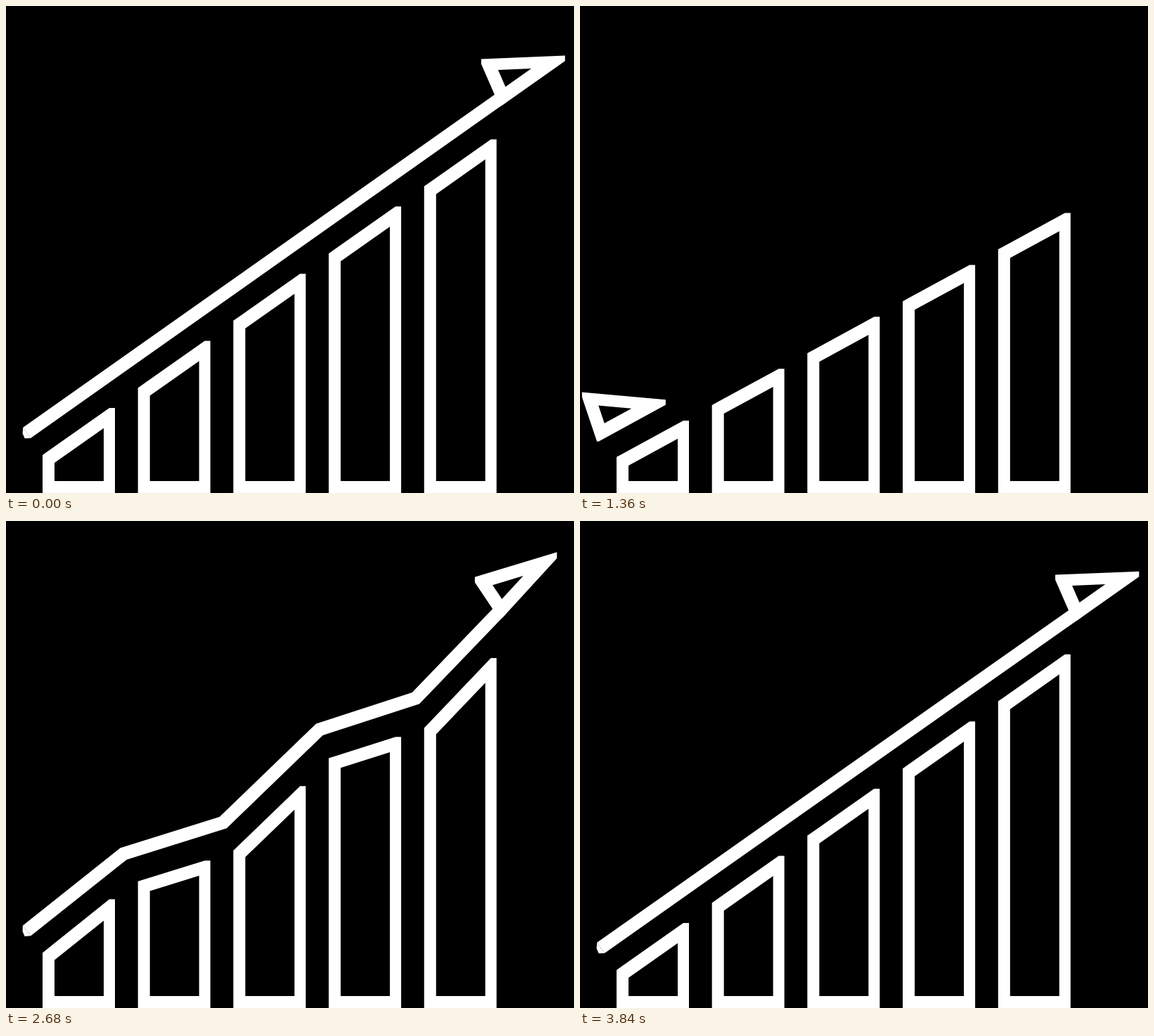
These frames come from a looping animation (808x693 px, 3880 ms). An HTML page with a canvas:

```html
<!DOCTYPE html>
<html lang="en">
<head>
<meta charset="utf-8">
<title>Growth chart</title>
<style>
  html, body { margin: 0; width: 100%; height: 100%; overflow: hidden; background: #000; }
  canvas { display: block; }
</style>
</head>
<body>
<canvas id="stage" width="808" height="693"></canvas>
<script>
const ctx = document.getElementById('stage').getContext('2d');
const LOOP = 3880, STEP = 40;
const SQUEEZE = 0.785; // the arrow turns in a space narrowed along x
const TILT = 29, LENGTH = 986, SLOPE = 0.7045;
const START = 29.6, BAR_X = 52, PITCH = 135.7, FLAT = 659;
const KNOTS = [START, 167, 309, 446, 583];

const clamp = v => Math.min(1, Math.max(0, v));
const phase = (t, from, to) => clamp((t - from) / (to - from));
const smooth = x => x * x * (3 - 2 * x);
const rad = deg => deg * Math.PI / 180;
const lerp = (a, b, k) => a + (b - a) * k;
const mixList = (a, b, k) => a.map((v, i) => lerp(v, b[i], k));
const mix = (a, b, k) => ({
  line: mixList(a.line, b.line, k),
  bars: mixList(a.bars, b.bars, k),
  endX: lerp(a.endX, b.endX, k),
  tilt: lerp(a.tilt, b.tilt, k)
});

// Poses: line heights at the knots and end, bar tops as left/right pairs
const straightBars = [0, 1, 2, 3, 4].flatMap(i =>
  [8.3, 95].map(dx => 583.6 - SLOPE * (BAR_X + i * PITCH + dx - 147)));
const straight = {
  line: [...KNOTS, 706.6].map(x => 607.3 - SLOPE * (x - START)),
  bars: straightBars, endX: 706.6, tilt: TILT
};
const zigzag = {
  line: [554, 430, 451, 276, 293, 121],
  bars: [590.3, 510.6, 484.8, 498.5, 498, 387.3, 328.6, 340.7, 343, 217],
  endX: 701.5, tilt: 54.3
};
const peak = mix(straight, zigzag, 1.3);
const relaxed = {
  line: [570, 522, 415, 350, 195, 134],
  bars: [613, 582, 561, 496, 461, 420, 393, 296, 242, 201],
  endX: 712, tilt: 16
};

function wavePose(t) {
  if (t < 3040) return mix(straight, peak, smooth(phase(t, 2600, 2800)));
  if (t < 3080) return mix(peak, zigzag, phase(t, 3040, 3080));
  if (t < 3600) return mix(zigzag, relaxed, smooth(phase(t, 3080, 3600)));
  return mix(relaxed, straight, smooth(phase(t, 3600, 3840)));
}

function tracePoly(pts) {
  pts.forEach(([x, y], i) => i ? ctx.lineTo(x, y) : ctx.moveTo(x, y));
  ctx.closePath();
}

// Half the stroke width, heavier on slanted edges
function half(dx, dy) {
  const a = Math.abs(dx), b = Math.abs(dy);
  return (8 * Math.max(a, b) + 5 * Math.min(a, b)) / Math.hypot(a, b);
}

function drawBar(x, yl, yr) {
  const s = (yr - yl) / 86.7;
  const v = half(1, s) * Math.hypot(1, s);
  const at = dx => yl + s * (dx - 8.3);
  const top = Math.min(at(8), at(95)) - v;
  const outer = dx => [x + dx, Math.max(top, at(dx) - v)];
  ctx.beginPath();
  tracePoly([outer(0), outer(8), outer(95), outer(103), [x + 103, 700], [x, 700]]);
  tracePoly([[x + 17, at(17) + v], [x + 87, at(87) + v], [x + 87, 676], [x + 17, 676]]);
  ctx.fill('evenodd');
}

function drawBars(tops) {
  for (let i = 0; i < 5; i++) drawBar(BAR_X + i * PITCH, tops[2 * i], tops[2 * i + 1]);
}

function offset(pts, side) {
  const edges = pts.map((p, i) => {
    const q = pts[(i + 1) % pts.length];
    const dx = q[0] - p[0], dy = q[1] - p[1];
    const k = side * half(dx, dy) / Math.hypot(dx, dy);
    return { x: p[0] + dy * k, y: p[1] - dx * k, dx, dy };
  });
  return edges.map((b, i) => {
    const a = edges[(i + edges.length - 1) % edges.length];
    const k = ((b.x - a.x) * b.dy - (b.y - a.y) * b.dx) / (a.dx * b.dy - a.dy * b.dx);
    return [a.x + a.dx * k, a.y + a.dy * k];
  });
}

function drawHead(x, y, tilt) {
  const c = Math.cos(rad(tilt)), s = Math.sin(rad(tilt));
  const turn = (u, v) => [x + SQUEEZE * (u * c + v * s), y - u * s + v * c];
  const tri = [turn(0, 0), turn(0, -52.6), turn(102.5, 0)];
  const [, fin, tip] = tri;
  // Sharp corners are cut square
  const left = fin[0] - 10.5, top = Math.min(fin[1] - 10.5, tip[1] - 17);
  ctx.save();
  ctx.beginPath();
  ctx.rect(left, top, tip[0] + 18.3 - left, y + 12.5 - top);
  ctx.clip();
  ctx.beginPath();
  tracePoly(offset(tri, 1));
  tracePoly(offset(tri, -1));
  ctx.fill('evenodd');
  ctx.restore();
}

function drawLine(pts) {
  const [[x, y], [x1, y1]] = pts;
  const len = Math.hypot(x1 - x, y1 - y);
  const nx = -(y1 - y) / len * 9.3, ny = (x1 - x) / len * 9.3;
  ctx.beginPath();
  pts.forEach(p => ctx.lineTo(...p));
  ctx.stroke();
  // Blunt start of the line
  ctx.beginPath();
  tracePoly([[x - nx, y - ny], [x - 6, y + 1], [x - 3, y + 8], [x + nx, y + ny]]);
  ctx.fill();
}

function drawRise(t) {
  const fall = t < 840;
  const p = fall ? 1 - smooth(phase(t, 0, 845)) : smooth(phase(t, 840, 1570));
  const len = LENGTH * (fall ? p ** 0.96 : phase(t, 1640, 2400) ** 2);
  const tilt = TILT * p, r = rad(tilt);
  const y = lerp(604, 607.3, Math.min(1, p * 2));
  const end = [START + SQUEEZE * len * Math.cos(r), y - len * Math.sin(r)];
  const lift = Math.tan(r) / Math.tan(rad(TILT));
  drawBars(straightBars.map(v => lerp(FLAT, v, lift)));
  if (len > 12) drawLine([[START, y], end]);
  drawHead(...end, tilt);
}

function drawWave(t) {
  const pose = wavePose(t);
  const pts = [...KNOTS, pose.endX].map((x, i) => [x, pose.line[i]]);
  drawBars(pose.bars);
  drawLine(pts);
  drawHead(...pts[5], pose.tilt);
}

function frame(now) {
  const t = Math.floor((now % LOOP) / STEP) * STEP;
  ctx.fillStyle = '#000';
  ctx.fillRect(0, 0, 808, 693);
  ctx.fillStyle = ctx.strokeStyle = '#fff';
  ctx.lineWidth = 18.6;
  ctx.lineJoin = 'miter';
  if (t < 2400) drawRise(t);
  else drawWave(t);
  requestAnimationFrame(frame);
}
frame(performance.now());
</script>
</body>
</html>
```
